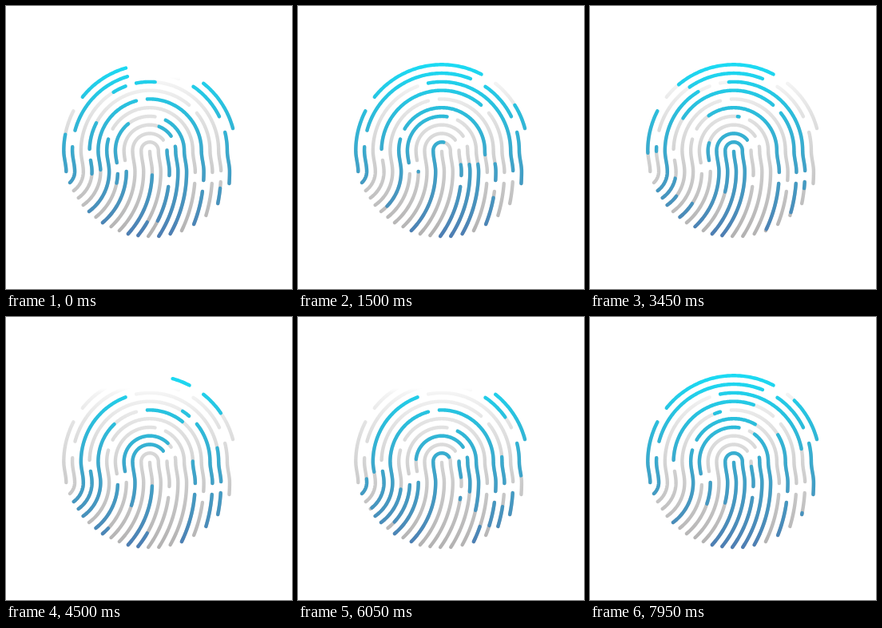
Animation of 358 by 354 pixels, one loop 8 s. Source, as an HTML page with a canvas:

```html
<!DOCTYPE html>
<html lang="en">
<head>
<meta charset="utf-8">
<title>Fingerprint scan</title>
<style>
  html, body { margin: 0; width: 100%; height: 100%; overflow: hidden; background: #fff; }
  canvas { display: block; width: 358px; height: 354px; }
</style>
</head>
<body>
<canvas id="stage"></canvas>
<script>
const W = 358, H = 354, LOOP = 8;
const CX = 180, CY = 181, SPACING = 10.77, DISC = 107.8;
const BEND = { x: 67, y: 207, radius: 116 }; // shared centre of all lower arcs
const SWEEP = 1.5; // seconds for an edge of colour to cross a ridge

const canvas = document.getElementById('stage');
const ctx = canvas.getContext('2d');
const dpr = window.devicePixelRatio || 1;
canvas.width = W * dpr;
canvas.height = H * dpr;

// A track runs up the left, over ring k and down the right.
// u is degrees from the top; past 90 it counts pixels below the centre.
function pointAt(k, u) {
  const side = Math.sign(u), r = k * SPACING;
  if (Math.abs(u) <= 90) {
    const a = u * Math.PI / 180;
    return [CX + r * Math.sin(a), CY - r * Math.cos(a)];
  }
  const y = CY + Math.abs(u) - 90;
  const bend = BEND.radius + side * r;
  if (y > BEND.y) return [BEND.x + Math.sqrt(bend ** 2 - (y - BEND.y) ** 2), y];
  const t = (y - CY) / (BEND.y - CY);
  const ease = t * t * (3 - 2 * t);
  const ringX = CX + side * r;
  return [ringX + (BEND.x + bend - ringX) * ease, y];
}

function makeTrack(k, from, to) {
  const path = new Path2D();
  const marks = [];
  let length = 0, last = null;
  for (let u = from; u <= to; u++) {
    const [x, y] = pointAt(k, u);
    const inside = Math.hypot(x - CX, y - CY) <= DISC;
    if (!inside && (y > BEND.y || isNaN(x))) continue;
    if (last) length += Math.hypot(x - last[0], y - last[1]);
    path.lineTo(x, y);
    marks.push({ u, length });
    last = [x, y];
  }
  const lengthAt = u => (marks.find(m => m.u >= u) || marks[marks.length - 1]).length;
  return { path, length, lengthAt };
}

// Each ring is cut at some places; every piece has its own start time.
const ridges = [];
function ring(k, cuts, starts, from = -205, to = 205) {
  const track = makeTrack(k, from, to);
  const gap = k > 8 ? 21 : 14;
  const edges = cuts.map(track.lengthAt);
  starts.forEach((start, i) => ridges.push({
    path: track.path,
    begin: i ? edges[i - 1] + gap / 2 : 0,
    end: i < edges.length ? edges[i] - gap / 2 : track.length,
    start,
    lit: 2.2 + 0.17 * k,
    period: k < 2 ? 4.5 : 7
  }));
}

ring(10, [-57.6, 33], [-0.9, -0.67, 3.8], -116, 75);
ring(9, [-81, 27.4, 69.5], [5.4, 6.1, 5, 5.1]);
ring(8, [-16, 122], [2.1, -0.2, 3]);
ring(7, [-95, 46, 124], [2.6, -0.3, 1.8, 2.1]);
ring(6, [-9, 134], [3.3, 4, 5]);
ring(5, [-67, 124], [5.3, 0.2, 2]);
ring(4, [-112, 18], [2.9, 6.1, 5]);
ring(3, [-109, 68], [4.3, 3.1, 5.5]);
ring(2, [70, 128], [1.5, 5.1, 6]);
ring(1, [], [0.75]);
ring(0, [], [1.9], 91);

function gradient(top, stops) {
  const g = ctx.createLinearGradient(0, top, 0, 290);
  stops.forEach(([at, colour]) => g.addColorStop(at, colour));
  return g;
}
const grey = gradient(89, [
  [0, '#ffffff'], [0.03, '#f4f4f4'], [0.2, '#e4e4e4'], [0.5, '#d1d1d1'], [1, '#b2b1b1']
]);
const blue = gradient(74, [
  [0, '#1bdaf3'], [0.25, '#2abfdd'], [0.55, '#3ea5ca'], [0.8, '#4892bd'], [1, '#4e7db3']
]);

const clamp = v => Math.min(1, Math.max(0, v));

// Strokes the part of a ridge between two fractions of its length.
function strokePart(r, a, b) {
  const length = r.end - r.begin;
  ctx.setLineDash([(b - a) * length, 2000]);
  ctx.lineDashOffset = -(r.begin + a * length);
  ctx.stroke(r.path);
}

function paintColour(r, t) {
  for (let n = -1; n <= 2; n++) {
    const age = t - r.start - n * r.period;
    const head = clamp(age / SWEEP);
    const tail = clamp((age - r.lit) / SWEEP);
    if (head - tail > 0.005) strokePart(r, tail, head);
  }
}

function draw(now) {
  const t = (now / 1000) % LOOP;
  ctx.setTransform(dpr, 0, 0, dpr, 0, 0);
  ctx.fillStyle = '#fff';
  ctx.fillRect(0, 0, W, H);
  ctx.lineWidth = 4.4;
  ctx.lineCap = ctx.lineJoin = 'round';

  ctx.strokeStyle = grey;
  ridges.forEach(r => strokePart(r, 0, 1));
  ctx.strokeStyle = blue;
  ridges.forEach(r => paintColour(r, t));
}

const start = performance.now();
function tick() {
  draw(performance.now() - start);
  requestAnimationFrame(tick);
}
tick();
</script>
</body>
</html>
```
